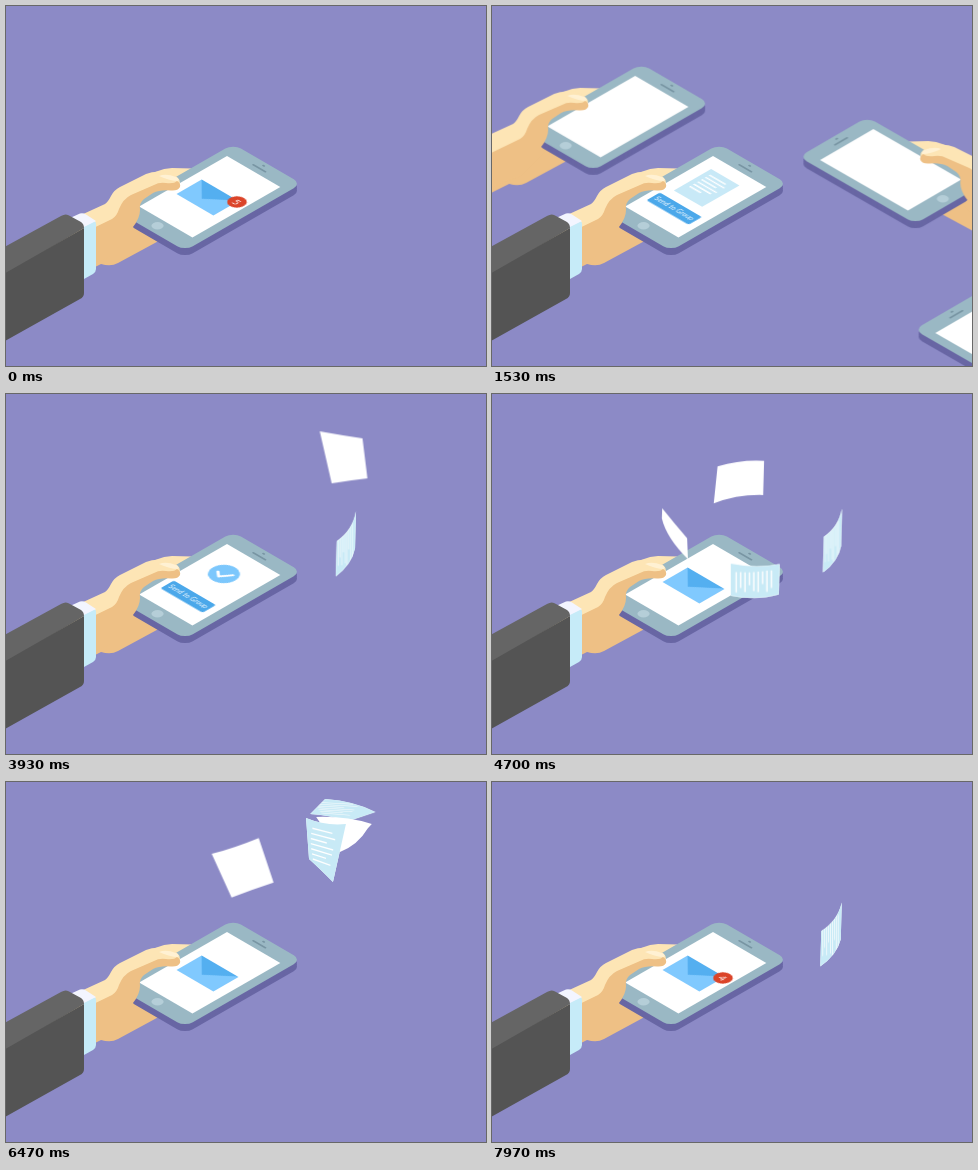
Write an HTML page without scripts that moves like this. It is 480 by 360 pixels and loops after 8000 ms.

```html
<!DOCTYPE html>
<html lang="en">
<head>
<meta charset="utf-8">
<title>Send to Group</title>
<style>
html, body { margin: 0; width: 100%; height: 100%; overflow: hidden; background: #8c8ac6; }
svg { display: block; width: 100%; height: 100%; }
text { font-family: Lato, sans-serif; fill: #fff; text-anchor: middle; }

/* every animation shares one 8 s clock, shifted by --d */
.a { animation: 8s linear calc(var(--d, 0s) - 8s) infinite; }

/* arms */
.enter { animation-name: enter; }
.visit { animation-name: visit; }
.lag { animation-name: lag; }
@keyframes enter {
  0%, .5% { transform: none; }
  .51%, 5.4% { transform: translate(-300px, 160px); animation-timing-function: cubic-bezier(.5, 1, .89, 1); }
  15.4%, to { transform: none; }
}
@keyframes visit {
  0%, 14% { transform: translate(-270px, 144px); animation-timing-function: cubic-bezier(.5, 1, .89, 1); }
  20.6% { transform: none; }
  38% { transform: none; animation-timing-function: cubic-bezier(.5, 0, .75, .4); }
  45%, to { transform: translate(-270px, 144px); }
}
@keyframes lag {
  0%, .5% { transform: none; }
  .51%, 10.4% { transform: translate(-45px, 24px); animation-timing-function: ease-out; }
  16%, to { transform: none; }
}

/* screens */
.doc { animation-name: doc; }
.send { animation-name: send; }
.check { animation-name: check; }
.mail { animation-name: mail; }
.got { animation-name: got; }
.ping { animation-name: ping; }
.badge { animation-name: badge; }
.tick { animation-name: tick; }
.four { animation-name: four; }
.five { animation-name: five; }
@keyframes doc {
  0%, .5% { opacity: 0; }
  .51%, 26.5% { opacity: 1; transform: none; }
  28.5%, to { opacity: 0; transform: translateY(-16px); }
}
@keyframes send { 0%, .5% { opacity: 0; } .51%, 53% { opacity: 1; } 55%, to { opacity: 0; } }
@keyframes check {
  0%, 28% { opacity: 1; transform: scale(0); }
  30% { transform: scale(1.12); }
  31%, 53% { opacity: 1; transform: none; }
  55%, to { opacity: 0; transform: none; }
}
@keyframes mail { 0%, .5% { opacity: 1; } .51%, 55% { opacity: 0; } 57%, to { opacity: 1; } }
@keyframes got { 0%, 29.5% { opacity: 0; } 31%, to { opacity: 1; } }
@keyframes ping { 0%, 31% { transform: scale(0); } 32.3% { transform: scale(1.2); } 33%, to { transform: none; } }
@keyframes badge {
  0%, .5% { transform: none; }
  .51%, 84.8% { transform: scale(0); }
  86% { transform: scale(1.2); }
  87%, to { transform: none; }
}
@keyframes tick { 0%, 84.99% { opacity: 0; } 85%, 88.24% { opacity: 1; } 88.25%, to { opacity: 0; } }
@keyframes four { 0%, 94.74% { opacity: 0; } 94.75%, to { opacity: 1; } }
@keyframes five { 0%, .5% { opacity: 1; } .51%, to { opacity: 0; } }

/* flying sheets: x and y swing apart, the outline bends on its own */
.x, .y { animation-timing-function: cubic-bezier(.37, 0, .63, 1); }
.x { animation-name: x; }
.y { animation-name: y; }
.bend { animation-name: bend; }
.late { animation-name: late; }
.down, .across { animation: 8s step-end calc(var(--d) - 8s) infinite; }
.down { animation-name: down; }
.across { animation-name: across; }
@keyframes x {
  0%, 43.5% { transform: translateX(335px); }
  48.75% { transform: translateX(341px); }
  55.875% { transform: translateX(181px); }
  62.375% { transform: translateX(341px); }
  68.625% { transform: translateX(181px); }
  74.8%, 77.625% { transform: translateX(338px); }
  80.875% { transform: translateX(315px); }
  85%, to { transform: translateX(231px); }
}
@keyframes y {
  0%, 43.49% { transform: translateY(-60px); }
  43.5% { transform: translateY(-35px); animation-timing-function: linear; }
  45.875% { transform: translateY(63px); animation-timing-function: linear; }
  49.125% { transform: translateY(150px); animation-timing-function: cubic-bezier(.61, 1, .88, 1); }
  52% { transform: translateY(187px); }
  59.25% { transform: translateY(87px); }
  65.75% { transform: translateY(187px); animation-timing-function: cubic-bezier(.12, 0, .39, 0); }
  68.375% { transform: translateY(140px); animation-timing-function: linear; }
  71.125% { transform: translateY(86px); animation-timing-function: linear; }
  74.375% { transform: translateY(28px); }
  77.625% { transform: translateY(52px); }
  80.875% { transform: translateY(68px); animation-timing-function: ease-in; }
  85% { transform: translateY(196px); }
  85.01%, to { transform: translateY(-60px); }
}
@keyframes bend {
  0%, 45.875% { d: path("M-24-26Q-2-22 19-19L24 21Q6 23-12 26Z"); }
  47.5%, 62.5% { d: path("M-2-22Q1-22 2-26L2 18Q1 22-2 24Z"); }
  49.125%, 63.4% { d: path("M-9-3Q7-14 10-33L9 4Q6 20-10 32Z"); }
  52%, 65.125% { d: path("M-25-18Q1-14 26-21L25 14Q1 23-25 19Z"); }
  53.75%, 66.8% { d: path("M-18-11Q0 0 18 9L18 12Q0 4-18-8Z"); }
  55.25%, 68.375% { d: path("M-11-26Q0-9 12 7L13 27Q-8 4-11-18Z"); }
  58.625% { d: path("M-22-15Q2-23 26-22L25 12Q-2 12-26 22Z"); }
  61.875% { d: path("M-7-30Q7-18 6-5L7 33Q4 17-7 6Z"); }
  71.125% { d: path("M-31-14Q-8-20 16-30L31 15Q10 22-11 30Z"); }
  72.75% { d: path("M-26-8Q0-14 24-8L22-4Q0-8-26-4Z"); }
  74.375% { d: path("M-17-11Q12-9 33 2L6 11Q-14 5-32 4Z"); }
  76% { d: path("M-24-14Q4-8 28-6L24-2Q0-2-24-10Z"); }
  77.625% { d: path("M-28-17Q2-18 28-10L24-6Q14 11-4 18Z"); }
  79.25% { d: path("M-6-26Q0-24 6-22L6 24Q0 14-6 8Z"); }
  80.875% { d: path("M-15-32Q4-24 25-26L12 32Q-2 18-12 9Z"); }
  85%, to { d: path("M-3-2Q0-2 3-1L3 2Q0 2-3 1Z"); }
}
@keyframes down { 0% { opacity: 0; } 47.5% { opacity: 1; } 53.75% { opacity: 0; } 62.5% { opacity: 1; } 66.8%, to { opacity: 0; } }
@keyframes across { 0% { opacity: 0; } 72.75% { opacity: 1; } 76% { opacity: 0; } 79.25% { opacity: 1; } 85%, to { opacity: 0; } }
@keyframes late { 0%, 92.99% { opacity: 0; } 93%, to { opacity: 1; } }
</style>
</head>
<body>
<svg viewBox="0 0 480 360">
  <defs>
    <pattern id="down" width="1" height="1" patternContentUnits="objectBoundingBox">
      <path fill="#c8eaf6" d="M0 0h1v1H0z"/>
      <path stroke="#fff" stroke-width=".03" d="M.11 .24v.6M.2 .24v.47M.29 .25v.58M.38 .25v.38M.47 .24v.56M.56 .23v.6M.65 .22v.37M.74 .2v.62M.83 .19v.52"/>
    </pattern>
    <pattern id="across" width="1" height="1" patternContentUnits="objectBoundingBox">
      <path fill="#c8eaf6" d="M0 0h1v1H0z"/>
      <path stroke="#fff" stroke-width=".022" d="M.16 .16l.5 .08M.13 .24l.6 .1M.12 .32l.4 .07M.12 .4l.56 .1M.13 .48l.52 .1M.15 .56l.35 .07M.17 .64l.44 .1"/>
    </pattern>

    <!-- screen space: x runs down-right, y runs down-left -->
    <rect id="slab" x="-8.5" y="-15.5" width="79.5" height="134" rx="9" transform="matrix(.86 .5 -.87 .5 221 150)"/>
    <g id="back">
      <path fill="#fde5b5" d="M136 176Q150 162 166 162L186 162.500L188 166L160 184Z"/>
      <path fill="#eec085" d="M-30 284L75 226L130 205L160 231L112 257Q105 261 95 258L75 268L-30 324Z"/>
      <g fill="#6866a4">
        <use href="#slab" y="7"/><use href="#slab" y="5"/><use href="#slab" y="3"/>
      </g>
      <use href="#slab" fill="#9ab8c4"/>
      <g transform="matrix(.86 .5 -.87 .5 221 150)">
        <path fill="#fff" d="M0 0h62v101H0z"/>
        <circle cx="30" cy="109.500" r="5" fill="#b5ced8"/>
        <path d="M24-6.500h14M30.500-11.500h1" fill="none" stroke="#7895a3" stroke-width="1.800" stroke-linecap="round"/>
      </g>
    </g>
    <g id="hand">
      <path fill="#fde5b5" d="M-30 265L75 209L99 198Q102 196 105 190Q108 184 114 181L140 168Q150 164 162 167Q174 170 174 177L150 183L112 212L75 232L-30 288Z"/>
      <path fill="#eec085" d="M-30 286L75 228L106 213Q111 210 113 203Q117 193 125 189L148 179Q153 176 160 177Q168 178 171 175Q175 177 174 181Q172 185 165 184.500Q154 183.500 147 187L138 193Q133 197 134 204Q134 212 127 221L130 226L106 250L75 262L-30 318Z"/>
      <path fill="#fff1d3" d="M153 170Q160 167 170 171Q174 173 172 175Q164 175 153 170Z"/>
    </g>
    <g id="sleeve">
      <path fill="#f3f5ff" d="M64 212L74 207.500Q77 206.500 80 208.500L90 215L78 224Z"/>
      <path fill="#c6ebf8" d="M78 221L88 216Q90 215 90 218V263Q90 266 87 268L78 273Z"/>
      <path fill="#656565" d="M-60 273L55 210Q60 207 64 210L75 216Q78 218 78 222L-60 304Z"/>
      <path fill="#545454" d="M-60 301L78 222V287Q78 291 74 293L-60 368Z"/>
    </g>
    <g id="envelope">
      <rect x="9" y="38" width="42" height="28" fill="#80c9fe"/>
      <path fill="#54aff0" d="M9 38H51L28.500 57Z"/>
    </g>
    <circle id="dot" r="8" fill="#db4429"/>
  </defs>

  <!-- top left -->
  <g transform="translate(-65 -87)">
    <g class="a visit">
      <use href="#back"/>
      <g transform="matrix(.86 .5 -.87 .5 221 150)">
        <use href="#envelope" class="a got"/>
        <g transform="translate(53.500 37.500)"><g class="a ping"><use href="#dot"/><text y="3.500" font-size="10">1</text></g></g>
      </g>
      <use href="#hand"/>
      <g class="a lag" style="--d:.5s"><use href="#sleeve"/></g>
    </g>
  </g>

  <!-- top right -->
  <g transform="matrix(-1 0 0 1 533 -64)" style="--d:.15s">
    <g class="a visit">
      <use href="#back"/>
      <g transform="matrix(.86 .5 -.87 .5 221 150)">
        <use href="#envelope" class="a got"/>
        <g transform="translate(10 35.500)"><g class="a ping"><use href="#dot"/><text y="3.500" font-size="10" transform="scale(-1 1)">1</text></g></g>
      </g>
      <use href="#hand"/>
      <g class="a lag" style="--d:.65s"><use href="#sleeve"/></g>
    </g>
  </g>

  <!-- centre -->
  <g class="a enter">
    <use href="#back"/>
    <g transform="matrix(.86 .5 -.87 .5 221 150)">
      <g class="a doc">
        <rect x="12" y="14" width="32" height="42" fill="#c8e9f7"/>
        <path d="M17 21h19M17 25.500h22M17 30h17M17 34.500h22M17 39h20M17 43.500h13" stroke="#fff" stroke-width="1.600"/>
      </g>
      <g class="a send">
        <rect x="6" y="67" width="49" height="15.500" rx="2" fill="#4ba8ea"/>
        <text x="30.500" y="77" font-size="6.800">Send to Group</text>
      </g>
      <g transform="translate(28.400 31.600)"><g class="a check">
        <circle r="13" fill="#7cc7fc"/>
        <path d="M-6 1L-.5 5.500L6.500-4" fill="none" stroke="#fff" stroke-width="2.600" stroke-linecap="round" stroke-linejoin="round"/>
      </g></g>
      <use href="#envelope" class="a mail"/>
      <g transform="translate(52 40)"><g class="a badge" font-size="10">
        <use href="#dot"/>
        <text class="a tick" y="3.500">1</text>
        <text class="a tick" y="3.500" style="--d:.26s">2</text>
        <text class="a tick" y="3.500" style="--d:.52s">3</text>
        <text class="a four" y="3.500">4</text>
        <text class="a five" y="3.500">5</text>
      </g></g>
    </g>
    <use href="#hand"/>
    <g class="a lag"><use href="#sleeve"/></g>
  </g>

  <!-- bottom right -->
  <g transform="matrix(-1 0 0 1 549 56)" style="--d:.3s">
    <g class="a visit">
      <use href="#back"/>
      <g transform="matrix(.86 .5 -.87 .5 221 150)">
        <use href="#envelope" class="a got"/>
        <g transform="translate(10 35.500)"><g class="a ping"><use href="#dot"/><text y="3.500" font-size="10" transform="scale(-1 1)">1</text></g></g>
      </g>
      <use href="#hand"/>
      <g class="a lag" style="--d:.8s"><use href="#sleeve"/></g>
    </g>
  </g>

  <!-- sheets, last one first -->
  <g class="a late"><g class="a x" style="--d:4.03s"><g class="a y">
    <path class="a bend" fill="#fff"/>
    <g class="down"><path class="a bend" fill="url(#down)"/></g>
  </g></g></g>
  <g class="a x" style="--d:.78s"><g class="a y">
    <path class="a bend" fill="#fff"/>
    <g class="down"><path class="a bend" fill="url(#down)"/></g>
    <g class="across"><path class="a bend" fill="url(#across)"/></g>
  </g></g>
  <g class="a x" style="--d:.52s"><g class="a y">
    <path class="a bend" fill="#fff"/>
    <g class="down"><path class="a bend" fill="url(#down)"/></g>
    <g class="across"><path class="a bend" fill="url(#across)"/></g>
  </g></g>
  <g class="a x" style="--d:.26s"><g class="a y">
    <path class="a bend" fill="#fff"/>
    <g class="down"><path class="a bend" fill="url(#down)"/></g>
    <g class="across"><path class="a bend" fill="url(#across)"/></g>
  </g></g>
  <g class="a x" style="--d:0s"><g class="a y">
    <path class="a bend" fill="#fff"/>
    <g class="down"><path class="a bend" fill="url(#down)"/></g>
    <g class="across"><path class="a bend" fill="url(#across)"/></g>
  </g></g>
</svg>
</body>
</html>
```
